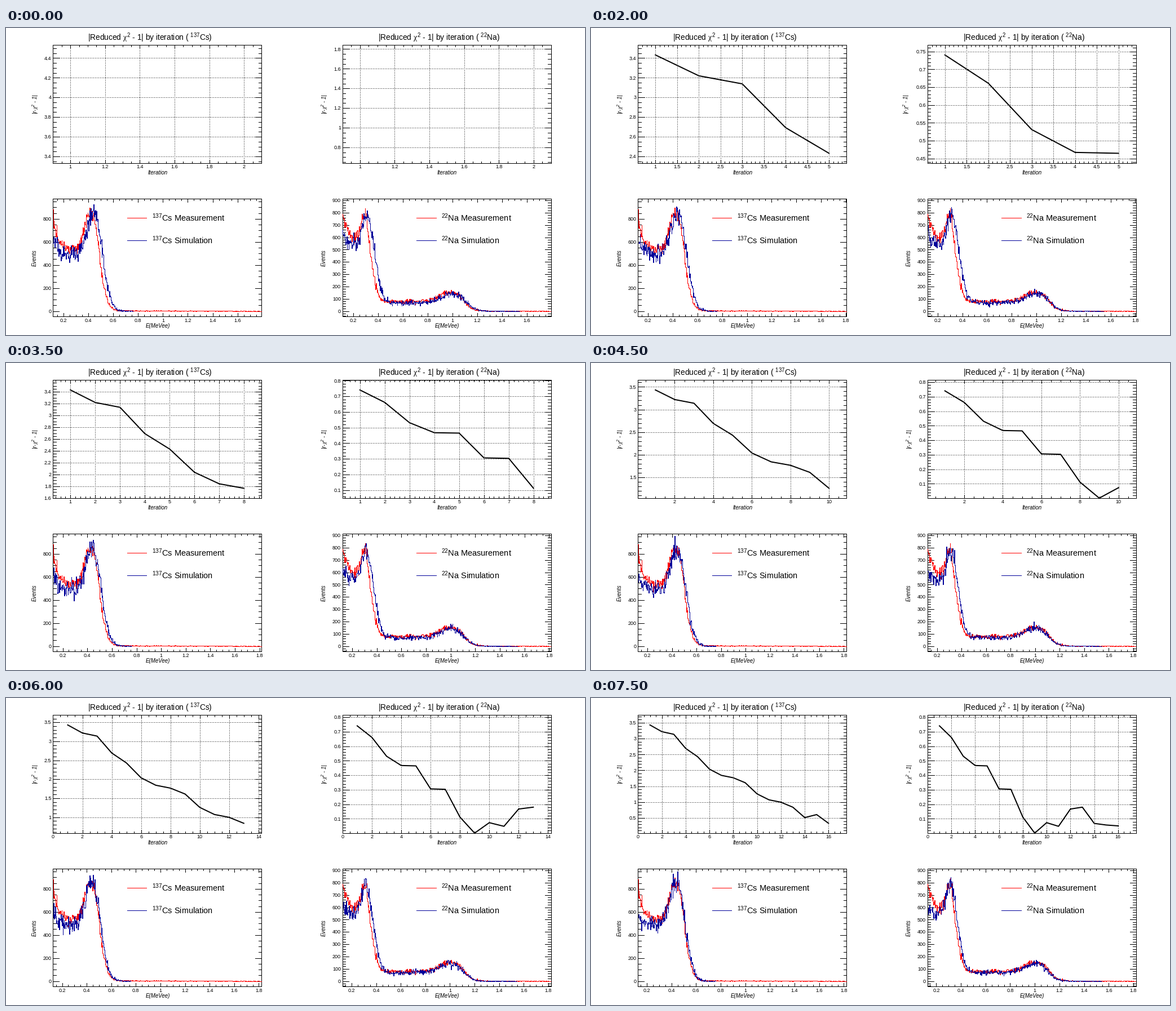
Recreate the animation shown at these times as a matplotlib script. Size 1027 px wide and 545 px high, loop 8000 ms.

```python
import math

import matplotlib.pyplot as plt
import numpy as np
from matplotlib.animation import FuncAnimation

W, H, DPI = 1027, 545, 100
PX = 72 / DPI
FRAMES, STEP_MS = 16, 500
LEFT, WIDTH, SHIFT = 83.45, 369.6, 513.5
TOP_BOX, LOW_BOX = (30.4, 239.9), (303, 512.4)
RED, BLUE = "#ff0000", "#000099"

plt.rcParams.update({
    "font.family": "Liberation Sans",
    "mathtext.fontset": "custom",
    "mathtext.default": "regular",
    "mathtext.it": "Liberation Serif",
    "mathtext.bf": "Liberation Serif:italic",
})

# |reduced chi^2 - 1| after each iteration
CS_CHI = [3.432, 3.22, 3.138, 2.692, 2.431, 2.038, 1.842, 1.766,
          1.61, 1.257, 1.07, 0.995, 0.838, 0.51, 0.605, 0.33]
NA_CHI = [0.7404, 0.661, 0.531, 0.467, 0.4645, 0.306, 0.303, 0.1115,
          0.001, 0.073, 0.048, 0.167, 0.18, 0.068, 0.057, 0.051]

fig = plt.figure(figsize=(W / DPI, H / DPI), dpi=DPI, facecolor="white")
ax = fig.add_axes([0, 0, 1, 1])


def label(x, y, text, size, **kw):
    kw.setdefault("ha", "center")
    ax.text(x, y, text, fontsize=size * PX, va="baseline", **kw)


def side_label(x, y, text):
    label(x, y, text, 9.8, style="italic", rotation=90,
          rotation_mode="anchor")


def line(xs, ys, color="black", width=1, snap=True, **kw):
    ax.plot(xs, ys, color=color, lw=width * PX, snap=snap, **kw)


def grid_line(xs, ys):
    line(xs, ys, linestyle=(0.5, (1, 2)))


def nice_step(span, parts):
    raw = span / parts
    base = 10 ** math.floor(math.log10(raw))
    return next(m * base for m in (1, 2, 5, 10) if raw <= m * base * 1.000001)


def multiples(step, lo, hi):
    first = math.ceil(lo / step - 1e-9)
    last = math.floor(hi / step + 1e-9)
    return [i * step for i in range(first, last + 1)]


def ticks(lo, hi):
    """Major values, then minor values, inside a range."""
    major = nice_step(hi - lo, 10)
    return multiples(major, lo, hi), multiples(nice_step(major, 5), lo, hi)


def scale(lo, hi, a, b):
    return lambda v: a + (v - lo) / (hi - lo) * (b - a)


def panel(left, box, xlim, ylim, grid):
    """Draw frame, ticks, labels and grid; return the scales and y labels."""
    top, bottom = box
    right = left + WIDTH
    sx = scale(*xlim, left, right)
    sy = scale(*ylim, bottom, top)
    line([left, right, right, left, left], [top, top, bottom, bottom, top])
    xmaj, xmin = ticks(*xlim)
    ymaj, ymin = ticks(*ylim)
    for values, size in ((xmin, 3), (xmaj, 6)):
        for x in map(sx, values):
            line([x, x], [bottom, bottom - size])
            line([x, x], [top, top + size])
    for values, size in ((ymin, 5.5), (ymaj, 11)):
        for y in map(sy, values):
            line([left, left + size], [y, y])
            line([right, right - size], [y, y])
    for v in xmaj:
        label(sx(v), bottom + 9.3, f"{v:.6g}", 9)
        if grid:
            grid_line([sx(v)] * 2, [top, bottom])
    names = [f"{v:.6g}" for v in ymaj]
    for v, name in zip(ymaj, names):
        label(left - 3, sy(v) + 3.2, name, 9, ha="right")
        if grid:
            grid_line([left, right], [sy(v)] * 2)
    return sx, sy, names


def chi_limits(vals):
    """Data range plus a tenth on each side, kept from going negative."""
    n, lo, hi = len(vals), min(vals), max(vals)
    if n == 1:
        return (0.9, 2.1), (lo - 0.1, lo + 1.1)
    dx, dy = 0.1 * (n - 1), 0.1 * (hi - lo)
    return (max(0, 1 - dx), n + dx), (lo - dy if lo > dy else 0.9 * lo, hi + dy)


def chi_panel(left, isotope, vals):
    sx, sy, names = panel(left, TOP_BOX, *chi_limits(vals), True)
    xs = [sx(i + 1) for i in range(len(vals))]
    ys = [sy(v) for v in vals]
    if len(vals) == 1:
        line(xs, ys, marker=",")
    else:
        line(xs, ys, width=2, snap=False)
    label(left + 171.5, 22,
          rf"|Reduced $\mathit{{\chi}}^2$ - 1| by iteration ( {isotope})", 13.7)
    label(left + 185.5, 260.5, "Iteration", 9.8, style="italic")
    offset = 33.5 if max(map(len, names)) > 3 else 27.5
    side_label(left - offset, 135.5, r"|r-$\mathbf{\chi}^2$ - 1|")


def hump(u, base, amp, peak, sigma, cut, soft):
    """Flat continuum with a peak, ended by a soft edge."""
    body = base + amp * np.exp(-((u - peak) / sigma) ** 2 / 2)
    return body / (1 + np.exp((u - cut) / soft))


def spectrum(humps, low, decay, tail, end, spread, seed):
    """Noisy events against pixels from the left edge."""
    u = np.arange(0, end, 0.74)
    mean = low * np.exp(-u / decay) + tail * (1 - u / end)
    mean += sum(hump(u, *h) for h in humps)
    noise = np.random.default_rng(seed).normal(size=u.size)
    return u, np.maximum(0, mean + spread * np.sqrt(mean) * noise)


def cs_spectra(k):
    red = spectrum([(525, 370, 69, 12, 86, 6)], 290, 8, 6, WIDTH, 1.05, 3)
    blue = spectrum([(480, 400, 72, 12, 94, 6)], 160, 9, 1, 142, 1.7, 100 + k)
    return red, blue


def na_spectra(k):
    red = spectrum([(510, 240, 39, 6, 53, 5), (75, 82, 193, 20, 221, 8)],
                   250, 6, 6, WIDTH, 1, 8)
    blue = spectrum([(470, 260, 44, 8, 62, 5), (68, 80, 197, 20, 225, 8)],
                    110, 6, 4, 315, 1.25, 200 + k)
    return red, blue


def energy_axis(k):
    """Pixels from the left edge to 0.2 and 1.8 MeVee; calibration drifts."""
    return 18.6 - 0.21 * k, max(371.2 - 0.7 * k, 365)


def event_panel(left, isotope, spectra, ylim, k):
    a, b = energy_axis(k)
    to_energy = scale(a, b, 0.2, 1.8)
    _, sy, _ = panel(left, LOW_BOX, (to_energy(0), to_energy(WIDTH)), ylim,
                     False)
    (red_x, red_y), (blue_x, blue_y) = spectra(k)
    line(left + red_x, sy(red_y), RED, drawstyle="steps-mid")

    # The simulation stays fixed in energy, so it follows the axis.
    blue_x = scale(*energy_axis(0), a, b)(blue_x)
    seen = blue_x >= 0
    line(left + blue_x[seen], sy(blue_y[seen]), BLUE, drawstyle="steps-mid")

    for row, color, name in ((337, RED, "Measurement"),
                             (377, BLUE, "Simulation")):
        line([left + 131.5, left + 166], [row, row], color)
        label(left + 175.5, row + 6, f"{isotope} {name}", 14.5, ha="left")
    label(left + 185.5, 532.5, "E(MeVee)", 9.8, style="italic")
    side_label(left - 30, 408, "Events")


def draw(k):
    ax.clear()
    ax.set(xlim=(0, W), ylim=(H, 0))
    ax.axis("off")
    cs, na = "$^{137}$Cs", "$^{22}$Na"
    chi_panel(LEFT, cs, CS_CHI[:k + 1])
    chi_panel(LEFT + SHIFT, na, NA_CHI[:k + 1])
    event_panel(LEFT, cs, cs_spectra, (-48, 975), k)
    event_panel(LEFT + SHIFT, na, na_spectra, (-45, 914), k)
    return []


anim = FuncAnimation(fig, draw, frames=FRAMES, interval=STEP_MS,
                     init_func=lambda: [], repeat=True, repeat_delay=0)
plt.show()
```
